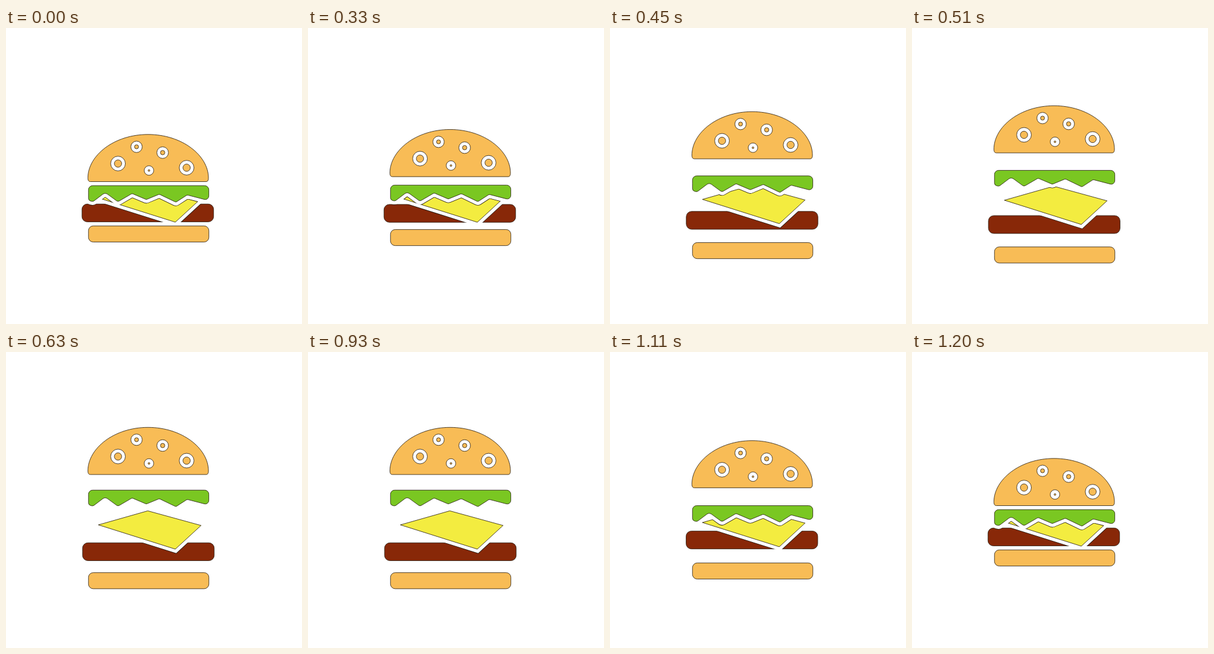
These frames come from a looping animation (500 by 500 pixels, 1.83 s). An HTML page with a canvas:

```html
<!DOCTYPE html>
<html lang="en">
<head>
<meta charset="utf-8">
<title>Burger</title>
<style>
  html, body { margin: 0; width: 100%; height: 100%; overflow: hidden; background: #fff; }
  canvas { display: block; width: 500px; height: 500px; }
</style>
</head>
<body>
<canvas id="stage" width="500" height="500"></canvas>
<script>
const LOOP = 1830, STEP = 30;
const INK = '#21170c', BUN = '#f8bc56', LEAF = '#7ac722', CHEESE = '#f3ec40', MEAT = '#882808';
const LINE = 0.8, GAP = 6;

const stage = document.getElementById('stage').getContext('2d');
const layerCanvas = document.createElement('canvas');
layerCanvas.width = layerCanvas.height = 500;
const layer = layerCanvas.getContext('2d');

const clamp = v => Math.min(1, Math.max(0, v));
const smooth = p => p * p * (3 - 2 * p);

// How far the buns and the filling have moved apart, 0 to 1.
function spread(time) {
  const t = Math.floor(time / STEP) * STEP;
  if (t < 930) {
    const p = clamp((t - 300) / 300);
    return { buns: clamp(1.592 * p + 0.087 * p * p - 0.679 * p ** 3), filling: smooth(p) };
  }
  const p = clamp((t - 930) / 270);
  return { buns: 1 - p ** 2.1, filling: 1 - smooth(p ** 0.85) };
}

function polygon(points, radius = 0) {
  const path = new Path2D();
  const n = points.length;
  const [ax, ay] = points[0], [bx, by] = points[n - 1];
  path.moveTo((ax + bx) / 2, (ay + by) / 2);
  points.forEach(([x, y, r = radius], i) => {
    const [nx, ny] = points[(i + 1) % n];
    path.arcTo(x, y, nx, ny, r);
  });
  path.closePath();
  return path;
}

function slab(x, y, w, h, r) {
  return polygon([[x, y], [x + w, y], [x + w, y + h], [x, y + h]], r);
}

function moved(path, x, y) {
  const out = new Path2D();
  out.addPath(path, new DOMMatrix([1, 0, 0, 1, x, y]));
  return out;
}

// Parts in their closed position.
const dome = new Path2D(
  'M138.3 253.5 C138.3 215 183 179.8 240 179.8 S342 215 342 253.5 ' +
  'Q342 259.5 338 259.5 H142.5 Q138.3 259.5 138.3 253.5 Z');
const seeds = [
  [189.2, 229, 12.4, 6.2], [220.5, 200.7, 9.6, 3.4], [264.6, 210.5, 9.8, 3.7],
  [241.5, 240.7, 8, 1.5], [305.1, 236, 12.4, 6.2]
];
const base = slab(139.3, 334.3, 203.4, 27.2, 8);
const meat = slab(128.3, 297.3, 222.4, 30.2, 9);
const cheese = polygon([[156, 287], [239.5, 263.3], [329.5, 288], [286, 328]]);
const leaf = polygon([
  [139.3, 266.3, 7], [342.6, 266.3, 7], [342.6, 291.5, 6], [306, 282, 3],
  [287, 294.3, 3], [259, 280.8, 3], [237, 289.8, 3], [213, 279.6, 3],
  [189, 293.5, 4], [167.5, 277.8, 7], [147, 293.3, 5], [139.3, 291.5, 5]
]);

function paint(ctx, path, fill) {
  ctx.fillStyle = fill;
  ctx.fill(path);
  ctx.strokeStyle = INK;
  ctx.lineWidth = LINE;
  ctx.stroke(path);
}

// Paints a part with an outlined gap cut around each part in front of it.
function paintBehind(path, fill, fronts) {
  layer.globalCompositeOperation = 'source-over';
  layer.clearRect(0, 0, 500, 500);
  paint(layer, path, fill);
  for (const [mode, width] of [['source-atop', 2 * (GAP + LINE)], ['destination-out', 2 * GAP]]) {
    layer.globalCompositeOperation = mode;
    layer.strokeStyle = layer.fillStyle = INK;
    layer.lineWidth = width;
    for (const front of fronts) {
      layer.fill(front);
      layer.stroke(front);
    }
  }
  stage.drawImage(layerCanvas, 0, 0);
}

function disc(x, y, r) {
  const path = new Path2D();
  path.arc(x, y, r, 0, 2 * Math.PI);
  return path;
}

function draw(time) {
  const { buns, filling } = spread(time);
  const lift = -52.5 * buns;
  const leafNow = moved(leaf, 0, -33 * filling);
  const cheeseNow = moved(cheese, 0, 5 * filling);

  stage.fillStyle = '#fff';
  stage.fillRect(0, 0, 500, 500);
  paint(stage, moved(base, 0, 38.4 * buns), BUN);
  paintBehind(moved(meat, filling, 25 * filling), MEAT, [cheeseNow, leafNow]);
  paintBehind(cheeseNow, CHEESE, [leafNow]);
  paint(stage, leafNow, LEAF);
  paint(stage, moved(dome, 0, lift), BUN);
  for (const [x, y, outer, inner] of seeds) {
    paint(stage, disc(x, y + lift, outer), '#fff');
    paint(stage, disc(x, y + lift, inner), BUN);
  }
}

const start = performance.now();
function tick() {
  draw((performance.now() - start) % LOOP);
  requestAnimationFrame(tick);
}
tick();
</script>
</body>
</html>
```
